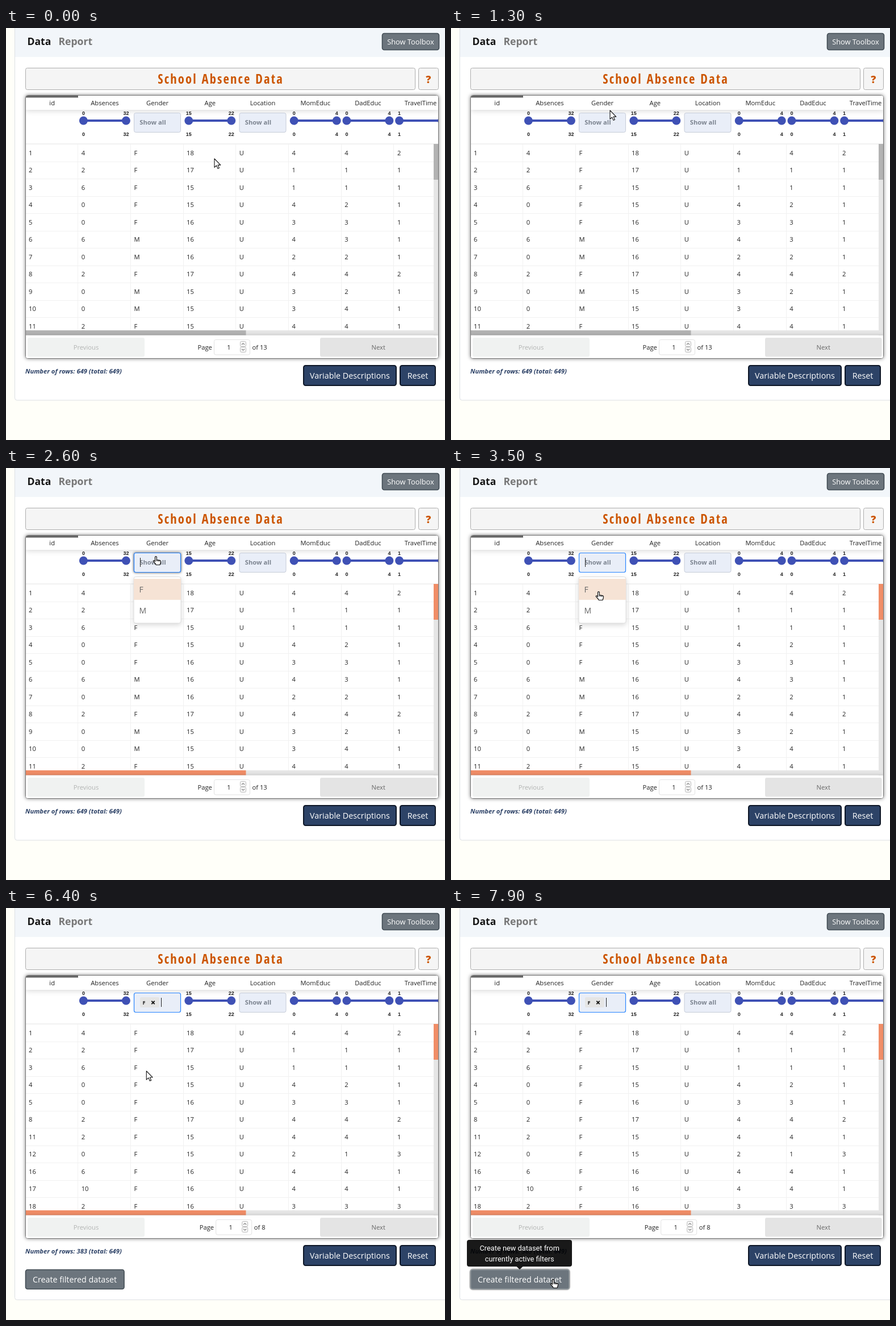
These frames come from a looping animation (773 px wide and 725 px high, 8000 ms). An HTML page:

```html
<!DOCTYPE html>
<html lang="en">
<head>
<meta charset="utf-8">
<title>School Absence Data</title>
<style>
html, body { margin: 0; width: 100%; height: 100%; overflow: hidden; background: #fffff9; }
svg { display: block; width: 773px; height: 725px; }
text { font: 11.2px "Open Sans", "Noto Sans", sans-serif; fill: #222; white-space: pre; }
.mid { text-anchor: middle; }
.tab { font-size: 17.6px; font-weight: 700; }
.title { font: 700 22.4px "Open Sans Condensed", "Open Sans", "Noto Sans", sans-serif; font-stretch: 75%; letter-spacing: 2.2px; fill: #cc5500; }
.help { font-size: 18px; font-weight: 800; fill: #cc5500; }
.small { font-size: 12.8px; fill: #fff; }
.btn { font-size: 14.3px; fill: #fff; }
.tick { font: 700 9px "Liberation Sans", Arial, sans-serif; text-anchor: middle; }
.hint { font-weight: 700; fill: #7c8490; }
.count { font-weight: 700; font-style: italic; fill: #2c4166; }
.option { font-size: 14px; fill: #666; }
.chip { font-size: 9px; font-weight: 700; }
.tip { font: 12.8px Roboto, sans-serif; fill: #fff; text-anchor: middle; }
.panel { fill: #f5f5f5; stroke: #adadad; }
.grey { fill: #6c757d; stroke: #424c54; stroke-width: 1.6; }
.navy { fill: #2d4367; stroke: #0d1626; stroke-width: 2; }
.select { fill: #e9eef8; stroke: #c6ccd8; }
.select.hover { stroke: #8e9299; filter: drop-shadow(0 0 2px #444); }
.select.focus { stroke: #2684ff; stroke-width: 1.2; }
.line { stroke: #f1f1f1; }
.track { fill: #e6e6e6; }
.thumb { fill: #b3b3b3; }
.thumb.active { fill: #f08d67; }
.hot { stroke: #929a9f; filter: drop-shadow(0 0 1px #222); }
</style>
</head>
<body>
<svg id="stage" viewBox="0 0 773 725" xmlns="http://www.w3.org/2000/svg"></svg>
<script>
const COL = 92.7, ROW = 30.5, LEFT = 35, BODY = 204;
const heads = ["id", "Absences", "Gender", "Age", "Location", "MomEduc", "DadEduc", "TravelTime"];
const ranges = { 1: [0, 32], 3: [15, 22], 5: [0, 4], 6: [0, 4], 7: [1, 4] };
const records = `1 4 F 18 U 4 4 2|2 2 F 17 U 1 1 1|3 6 F 15 U 1 1 1|4 0 F 15 U 4 2 1
5 0 F 16 U 3 3 1|6 6 M 16 U 4 3 1|7 0 M 16 U 2 2 1|8 2 F 17 U 4 4 2|9 0 M 15 U 3 2 1
10 0 M 15 U 3 4 1|11 2 F 15 U 4 4 1|12 0 F 15 U 2 1 3|16 6 F 16 U 4 4 1|17 10 F 16 U 4 4 1
18 2 F 16 U 3 3 3`.split(/[|\n]/).map(r => r.split(" "));

const colX = i => LEFT + COL * i;
const text = (x, y, s, cls = "", more = "") => `<text x="${x}" y="${y}" class="${cls}" ${more}>${s}</text>`;
const rect = (x, y, w, h, cls = "", more = "") =>
  `<rect x="${x}" y="${y}" width="${w}" height="${h}" class="${cls}" ${more}/>`;
const list = (n, fn) => Array.from({ length: n }, (_, i) => fn(i)).join("");

function slider([lo, hi], col) {
  const a = colX(col) + 8.7, b = a + 75;
  const ends = [[a, lo], [b, hi]];
  return `<path d="M${a} 163H${b}" stroke="#3f51b5" stroke-width="4"/>` + ends.map(([x, v]) =>
    `<circle cx="${x}" cy="163" r="7.5" fill="#3f51b5"/>` +
    text(x, 152.5, v, "tick") + text(x, 189.5, v, "tick")).join("");
}

function tableRows(filtered) {
  const shown = records.filter(r => !filtered || r[2] === "F").slice(0, 11);
  return shown.map((r, i) => r.map((v, c) =>
    text(colX(c) + 5, 223.7 + ROW * i, v)).join("")).join("");
}

function spinner(y, dir) {
  return rect(412.5, y, 10, 9, "", `rx="2" fill="#f6f6f6" stroke="#bbb"`) +
    `<path d="M415 ${y + 4.5 + dir}l2.5 ${-2 * dir} 2.5 ${2 * dir}" fill="none" stroke="#444"/>`;
}

const stage = document.getElementById("stage");
stage.innerHTML = `
<defs>
  <clipPath id="table">${rect(35, 119, 726, 462, "", 'rx="3"')}</clipPath>
  <clipPath id="rows">${rect(35, BODY, 718, 328)}</clipPath>
</defs>
${rect(0, 0, 773, 725, "", 'fill="#fffff9"')}
${rect(15.5, -10, 780, 665, "", 'id="card" rx="4" fill="#fff" stroke="#dcdfe4"')}
${rect(16, 0, 757, 51, "", 'fill="#f2f6fa"')}
${text(37.4, 30, "Data", "tab", 'style="fill:#151515"')}
${text(92.4, 30, "Report", "tab", 'style="fill:#777"')}
${rect(662.5, 9.5, 100, 29, "grey", 'rx="3.5"')}
${text(712.5, 28.6, "Show Toolbox", "small mid")}
${rect(34.5, 70.5, 686, 38, "panel", 'rx="3"')}
${text(378, 98, "School Absence Data", "title mid")}
${rect(726.5, 70.5, 35, 38, "panel", 'rx="3"')}
${text(743.8, 96.5, "?", "help mid")}

${rect(34.5, 118.5, 727, 463, "", 'rx="4" fill="#fff" stroke="#777" style="filter:drop-shadow(0 0 3px rgba(0,0,0,.5))"')}
<g clip-path="url(#table)">
  <g clip-path="url(#rows)">
    ${list(11, i => `<path class="line" d="M35 ${Math.round(BODY + ROW * i) + .5}H753"/>`)}
    ${list(7, i => `<path class="line" d="M${Math.floor(colX(i + 1)) - .5} 204V532"/>`)}
    <g id="all">${tableRows(false)}</g>
    <g id="filtered">${tableRows(true)}</g>
  </g>
  <path class="line" d="M35 203.5H761"/>
  ${rect(753, BODY, 8, 337, "track")}
  ${rect(35, 532, 718, 8.5, "track")}
  ${rect(753, BODY, 8, 63, "thumb")}
  ${rect(35, 532, 387.5, 8.5, "thumb")}
  ${rect(35, 119, 726, 25, "", 'fill="#fff" style="filter:drop-shadow(0 2px 5px rgba(0,0,0,.15))"')}
  ${rect(35, 119, 92, 3.5, "", 'fill="#666"')}
  ${heads.map((h, i) => text(colX(i) + 46.2, 136, h, "mid")).join("")}
  ${Object.entries(ranges).map(([c, r]) => slider(r, +c)).join("")}
  ${rect(35, 541, 726, 41, "", 'fill="#fff" style="filter:drop-shadow(0 0 3px rgba(0,0,0,.2))"')}
  ${rect(38, 545, 206, 33.5, "", 'rx="3" fill="#f0f2f1"')}
  ${text(141, 566, "Previous", "mid", 'style="fill:#b2b4b3"')}
  ${rect(553, 545, 205.5, 33.5, "", 'rx="3" fill="#e4e4e4"')}
  ${text(655.7, 566, "Next", "mid", 'style="fill:#686868"')}
  <g id="pager">
    ${text(337.5, 566, "Page")}
    ${rect(366.5, 548.5, 63, 26.5, "", 'rx="3" fill="#fff" stroke="#e2e2e2"')}
    ${text(392.5, 566, "1", "mid")}
    ${spinner(551.5, 1)}${spinner(561.5, -1)}
    ${text(433.5, 566, "", "", 'id="pages"')}
  </g>
</g>

${rect(225.5, 149.5, 82, 34, "select", 'id="gender" rx="3"')}
${rect(411, 149.5, 82, 34, "select", 'rx="3"')}
${text(235.3, 170, "Show all", "hint", 'id="hint"')}
${text(420.8, 170, "Show all", "hint")}
<g id="chip">
  ${rect(236, 157, 34, 18, "", 'rx="2" fill="#e5e5e5"')}
  ${text(240.5, 170, "F", "chip")}
  <path d="M256.3 163.7l5.4 5.4m0-5.4l-5.4 5.4" stroke="#111" stroke-width="1.9"/>
</g>
<path id="caret" stroke="#222"/>
<g id="menu">
  ${rect(225, 191.5, 83, 81.5, "", 'rx="3.5" fill="#fff" stroke="#ddd" style="filter:drop-shadow(0 3px 4px rgba(0,0,0,.15))"')}
  ${rect(225, 195, 83, 37, "", 'fill="#f6e3d5"')}
  ${text(234.5, 219, "F", "option")}
  ${text(234.5, 256, "M", "option")}
</g>

${text(34, 608.3, "", "count", 'id="count"')}
${rect(524, 594, 163, 35, "navy", 'rx="3.5"')}
${text(605.5, 617, "Variable Descriptions", "btn mid")}
${rect(694, 594, 62, 35, "navy", 'rx="3.5"')}
${text(725, 617, "Reset", "btn mid")}
<g id="create">
  ${rect(34.5, 636.5, 173.5, 34, "grey", 'id="createBox" rx="3.5"')}
  ${text(121, 658.5, "Create filtered dataset", "btn mid")}
</g>
<g id="tooltip">
  <path d="M32 584H209q4 0 4 4V627q0 4-4 4H126.500l-5.500 5-5.500-5H32q-4 0-4-4V588q0-4 4-4z" opacity=".9"/>
  ${text(120.7, 603, "Create new dataset from", "tip")}
  ${text(120.7, 622, "currently active filters", "tip")}
</g>
<g id="cursor" stroke="#111" fill="#fff" stroke-linejoin="round">
  <path id="arrow" stroke-width="1.1" d="M0 0V15.300L3.600 12 6 17.400 8.400 16.300 6.100 11.100H10.800z"/>
  <g id="hand" stroke-width="1.2">
    <path d="M-1.500 9V1.500a1.400 1.400 0 0 1 2.800 0V6L7.200 7.100q1.400.4 1.300 2L8 12 7 15H.2L-.8 13-4.600 8.800q-.4-1.800 1.400-1.500z"/>
    <path d="M1.300 6V8.500M3.600 6.500V8.800M5.800 7V9" fill="none"/>
  </g>
</g>`;

const el = Object.fromEntries([...stage.querySelectorAll("[id]")].map(e => [e.id, e]));
const thumbs = stage.querySelectorAll(".thumb");
const show = (e, on) => e.setAttribute("display", on ? "inline" : "none");

const linear = k => k, easeOut = k => 1 - (1 - k) ** 2;
// [start, steps, x, y, easing]
const moves = [
  [500, 9, 280, 145, linear],
  [2200, 1, 264, 155.5, linear],
  [3100, 5, 260, 217.500, linear],
  [4700, 1, 259, 219, linear],
  [6400, 4, 212, 490.500, linear],
  [6900, 4, 190, 592.500, linear],
  [7600, 4, 180, 653.500, easeOut]
];

function cursorAt(t) {
  let x = 367, y = 230;
  for (const [start, steps, toX, toY, ease] of moves) {
    if (t < start) break;
    const k = ease(Math.min(1, ((t - start) / 100 + 1) / steps));
    x += (toX - x) * k;
    y += (toY - y) * k;
  }
  return [x, y];
}

const inside = ([x, y], l, t, r, b) => x > l && x < r && y > t && y < b;

function render(time) {
  const t = Math.floor(time / 100) * 100;
  const focused = t >= 2500, filtered = t >= 4700;
  const menuOpen = focused && !filtered;
  const at = cursorAt(t);
  const overSelect = inside(at, 225, 149, 308, 184);
  const overCreate = filtered && inside(at, 34, 636, 209, 671);
  const hand = overSelect || overCreate || (menuOpen && inside(at, 225, 195, 308, 273));

  el.cursor.setAttribute("transform", `translate(${at})`);
  show(el.hand, hand);
  show(el.arrow, !hand);

  el.gender.setAttribute("class", `select${overSelect ? " hover" : ""}${focused ? " focus" : ""}`);
  thumbs.forEach(e => e.classList.toggle("active", focused));
  show(el.menu, menuOpen);
  el.menu.setAttribute("opacity", t < 2600 ? .5 : 1);
  show(el.hint, !filtered);
  show(el.chip, filtered);
  show(el.caret, focused);
  el.caret.setAttribute("d", `M${filtered ? 273.5 : 236.5} 158V174`);

  show(el.all, !filtered);
  show(el.filtered, filtered);
  show(el.create, filtered);
  el.createBox.classList.toggle("hot", overCreate);
  el.card.setAttribute("height", filtered ? 699.5 : 665);
  el.pager.setAttribute("transform", `translate(${filtered ? 3.2 : 0})`);
  el.pages.textContent = filtered ? "of 8" : "of 13";
  el.count.textContent = `Number of rows: ${filtered ? 383 : 649} (total: 649)`;

  show(el.tooltip, t >= 7800);
  el.tooltip.setAttribute("opacity", t < 7900 ? .5 : 1);
}

const began = performance.now();
function tick() {
  render((performance.now() - began) % 8000);
  requestAnimationFrame(tick);
}
tick();
</script>
</body>
</html>
```
